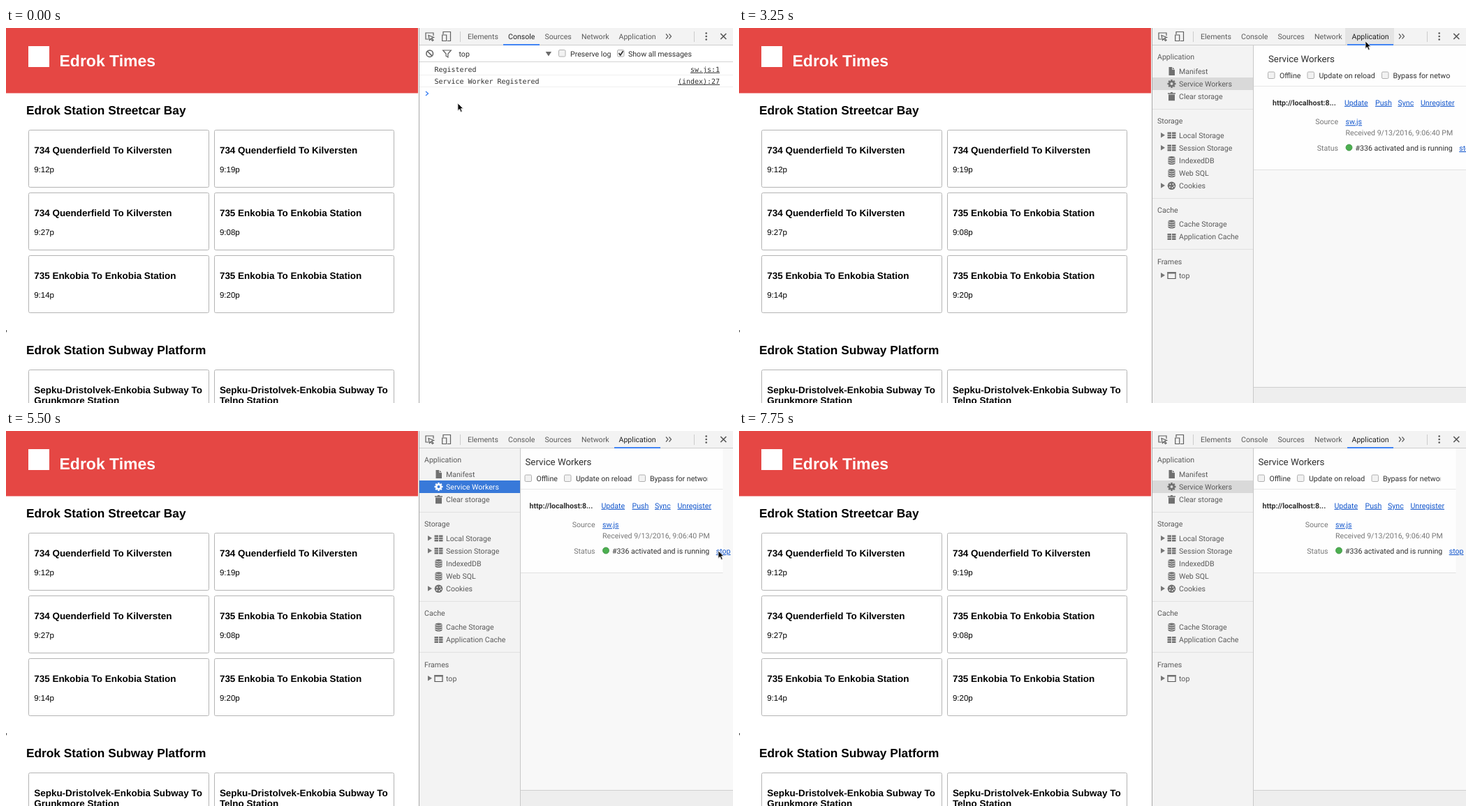
These frames come from a looping animation (1041x538 px, 8000 ms). An HTML page:

```html
<!DOCTYPE html>
<html lang="en">
<head>
<meta charset="utf-8">
<title>Departures with developer tools</title>
<style>
html, body { margin: 0; width: 100%; height: 100%; overflow: hidden; background: #fff; }
svg { display: block; width: 1041px; height: 538px; text-rendering: geometricPrecision; }
text { white-space: pre; }
.page { font-family: "Liberation Sans", Arial, sans-serif; font-size: 11.52px; fill: #000; }
.page .title { font-size: 23px; font-weight: 700; fill: #fff; }
.page .h2 { font-size: 17.3px; font-weight: 700; }
.page .h3 { font-size: 13.48px; font-weight: 700; }
.tools { font-family: Roboto, Inter, sans-serif; font-size: 10.6px; fill: #303030; }
.tools .tab, .tools .item { fill: #5a5a5a; }
.tools .tab.on { fill: #222; }
.tools .big { font-size: 13.25px; }
.tools .bold { font-weight: 700; }
.tools .dim { fill: #777; }
.tools .link { fill: #1155cc; text-decoration: underline; }
.tools .mono { font-family: "DejaVu Sans Mono", monospace; font-size: 9.97px; }
.tools .under { text-decoration: underline; }
.line { fill: none; stroke: #5f5f5f; stroke-width: 1.2; }
.ico { fill: #707070; color: #f3f3f3; }
.ring { fill: none; stroke: #707070; stroke-width: 2.6; }
.focused .ico { fill: #fff; color: #3879d9; }
.focused .ring { stroke: #fff; }
.focused .item { fill: #fff; }
</style>
</head>
<body>
<svg id="stage" viewBox="0 0 1041 538"></svg>
<script>
const text = (x, y, str, cls = "", extra = "") =>
  `<text x="${x}" y="${y}" class="${cls}" ${extra}>${str}</text>`;
const rect = (x, y, w, h, fill, extra = "") =>
  `<rect x="${x}" y="${y}" width="${w}" height="${h}" fill="${fill}" ${extra}/>`;
const path = (d, extra = 'class="line"') => `<path d="${d}" ${extra}/>`;
const end = 'text-anchor="end"';

// Timetable page; card borders snap to whole pixels
const snap = v => Math.floor(v) + .5;
const card = (x, y, lines, time) =>
  rect(snap(x), snap(y), snap(x + 257.6) - snap(x), snap(y + 82.1) - snap(y), "#fff", 'rx="2" stroke="#b4b4b4"') +
  lines.map((s, i) => text(x + 7.7, y + 33.6 + i * 15, s, "h3")).join("") +
  (time ? text(x + 7.7, y + 60.3, time) : "");

const lakeLine = "734 Quenderfield To Kilversten";
const hillLine = "735 Enkobia To Enkobia Station";
const departures = [
  [lakeLine, "9:12p"], [lakeLine, "9:19p"], [lakeLine, "9:27p"],
  [hillLine, "9:08p"], [hillLine, "9:14p"], [hillLine, "9:20p"]
];
const column = i => 32.5 + (i % 2) * 265.7;

const page = `<g class="page">
  ${rect(0, 0, 591, 538, "#fff")}
  ${rect(0, 0, 590, 93.5, "#e54744")}
  ${rect(32, 26, 30, 30, "#fff")}
  ${text(76.5, 55, "Edrok Times", "title")}
  ${text(29, 123.7, "Edrok Station Streetcar Bay", "h2")}
  ${departures.map(([name, time], i) =>
    card(column(i), 146.4 + Math.floor(i / 2) * 89.9, [name], time)).join("")}
  ${text(-1, 434.5, ",")}
  ${text(29, 468, "Edrok Station Subway Platform", "h2")}
  ${["Grunkmore Station", "Telno Station"].map((stop, i) =>
    card(column(i), 490.4, ["Sepku-Dristolvek-Enkobia Subway To", stop])).join("")}
</g>`;

// Developer tools
const tabs = [["Elements", 661], ["Console", 719], ["Sources", 771.5], ["Network", 824], ["Application", 877.5]];
const toolbar =
  rect(592, 0, 449, 24, "#f3f3f3") +
  rect(868, 0, 70, 24, "#e4e4e4", 'id="hover"') +
  rect(592, 24, 449, 1, "#cdcdcd") +
  path("M605 16h-4v-9h11v4M605 10.5l7.5 3-3 1 2.5 3-1.5 1-2.3-3-1.8 2z") +
  path("M626 9V5.5h10.5v13H632M624.7 10h6v8.5h-6z") +
  path("M650.5 5v15M985.5 5v15", 'stroke="#ccc"') +
  tabs.map(([name, x]) => text(x, 15.8, name, "tab", `id="tab${name}"`)).join("") +
  path("M945 8.5l3 3.5-3 3.5M949.5 8.5l3 3.5-3 3.5") +
  [7.5, 12, 16.5].map(y => `<circle cx="1002.7" cy="${y}" r="1.3" fill="#555"/>`).join("") +
  path("M1023.3 8l8 8m0-8l-8 8", 'stroke="#555" stroke-width="1.6"') +
  rect(0, 23, 1, 2, "#4285f4", 'id="underline"');

const checkbox = (x, y, on) =>
  rect(x + .5, y + .5, 9.5, 9.5, "#f2f2f2", 'rx="1.5" stroke="#b0b0b0"') +
  (on ? path(`M${x + 2.5} ${y + 5}l2.2 3 4-6`, 'fill="none" stroke="#333" stroke-width="1.7"') : "");

const logRow = (y, message, place) =>
  text(613.5, y, message, "mono") + text(1022, y, place, "mono under", end) +
  rect(592, y + 4.2, 449, 1, "#f0f0f0");

const consoleView = `<g id="console">
  ${rect(592, 25, 449, 513, "#fff")}
  ${rect(592, 48, 449, 1, "#d4d4d4")}
  <circle cx="606.7" cy="36.7" r="4.8" class="line" style="stroke-width:1.5"/>
  ${path("M603.3 33.3l6.8 6.8", 'class="line" style="stroke-width:1.5"')}
  ${path("M625.7 32h11.6l-4.4 5v5l-2.8-1.8V37z")}
  ${text(648.5, 40.5, "top")}
  ${path("M772.7 34h8.4l-4.2 6.5z", 'fill="#6b6b6b"')}
  ${checkbox(791, 31)}${text(808, 40.5, "Preserve log")}
  ${checkbox(875, 31, true)}${text(891, 40.5, "Show all messages")}
  ${logRow(62.8, "Registered", "sw.js:1")}
  ${logRow(79.8, "Service Worker Registered", "(index):27")}
  ${path("M601 91l3.4 3-3.4 3", 'fill="none" stroke="#4285f4" stroke-width="1.5"')}
  ${rect(614, 88, 1, 11, "#222", 'id="caret"')}
</g>`;

// Sidebar icons, centred on their own origin
const icons = {
  doc: '<path d="M-4-6H1L4.5-2.5V6H-4z"/><path d="M1-6v3.5h3.5" fill="none" stroke="currentColor" stroke-width=".8"/>',
  gear: '<circle r="3.3" class="ring"/>' +
    [0, 45, 90, 135].map(a => `<path d="M-1.2-6h2.4v3h-2.4zM-1.2 3h2.4v3h-2.4z" transform="rotate(${a})"/>`).join(""),
  trash: '<path d="M-5.5-5H-2l1-1.2h2l1 1.2h3.5v1.5h-11zM-4.5-2.7h9V6h-9z"/>',
  table: [-4.5, -1.3, 1.9].map(y => `<path d="M-6 ${y}h5.5v2.5H-6zM.5 ${y}H6v2.5H.5z"/>`).join(""),
  db: '<path d="M-5-4C-5-6.7 5-6.7 5-4V4C5 6.7-5 6.7-5 4z"/>' +
    [-3.6, -.5, 2.6].map(y => `<path d="M-5 ${y}q5 3 10 0" fill="none" stroke="currentColor" stroke-width=".9"/>`).join(""),
  cookie: '<circle r="5.8"/>' + [[-2, -2], [2, -2.4], [-2.6, 2], [1, 2.6], [3.4, .8]].map(
    ([x, y]) => `<circle cx="${x}" cy="${y}" r="1" fill="currentColor"/>`).join(""),
  frame: '<path d="M-5.5-4.5h11v9h-11z" fill="none" stroke="#555" stroke-width="1.2"/><path d="M-6-5H6v2.5H-6z"/>'
};
const item = (y, icon, name, opens) =>
  (opens ? path(`M604 ${y - 4}l6 3.7-6 3.7z`, 'fill="#777"') : "") +
  `<g class="ico" transform="translate(619.5 ${y})">${icons[icon]}</g>` +
  text(630, y + 3.9, name, "item");
const heading = (y, name) => text(599, y + 4, name, "item");

const sidebar =
  rect(592, 25, 144, 513, "#f3f3f3") + rect(736, 25, 1, 513, "#c8c8c8") +
  [116, 244, 317].map(y => rect(592, y, 144, 1, "#e1e1e1")).join("") +
  heading(41, "Application") + item(62, "doc", "Manifest") +
  `<g id="selected">${rect(592, 71, 144, 18, "#d9d9d9", 'id="selection"')}${item(80, "gear", "Service Workers")}</g>` +
  item(98.3, "trash", "Clear storage") +
  heading(133, "Storage") +
  item(154, "table", "Local Storage", true) + item(172, "table", "Session Storage", true) +
  item(190, "db", "IndexedDB") + item(208.3, "db", "Web SQL") + item(226.3, "cookie", "Cookies", true) +
  heading(260.5, "Cache") + item(281.5, "db", "Cache Storage") + item(299.5, "table", "Application Cache") +
  heading(334.5, "Frames") + item(355, "frame", "top", true);

const links = [["Update", 867], ["Push", 911], ["Sync", 943.5], ["Unregister", 976]];
const workers = `<g id="workers">
  ${rect(737, 25, 304, 178, "#fefefe")}
  ${rect(737, 83, 304, 1, "#e6e6e6")}${rect(737, 203, 304, 1, "#e0e0e0")}
  ${text(758, 48.6, "Service Workers", "big")}
  ${checkbox(757, 62.5)}${text(774, 71.8, "Offline")}
  ${checkbox(813.5, 62.5)}${text(830.5, 71.8, "Update on reload")}
  ${checkbox(920, 62.5)}${text(936.5, 71.8, "Bypass for network", "", 'clip-path="url(#cut)"')}
  ${text(764, 110.8, "http://localhost:8...", "bold")}
  ${links.map(([name, x]) => text(x, 110.8, name, "link")).join("")}
  ${text(858, 138.3, "Source", "dim", end)}${text(868.5, 138.3, "sw.js", "link")}
  ${text(868.5, 153.6, "Received 9/13/2016, 9:06:40 PM", "dim")}
  ${text(858, 176, "Status", "dim", end)}
  <circle cx="873.5" cy="171.5" r="4.5" fill="#4caf50" stroke="#3c8f42" stroke-width=".8"/>
  ${text(882.5, 176, "#336 activated and is running")}${text(1031.2, 176, "stop", "link")}
</g>`;

const application = `<g id="application">
  ${rect(737, 25, 304, 513, "#f8f8f8")}
  ${workers}
  ${rect(737, 516, 304, 22, "#eee")}${rect(737, 515, 304, 1, "#d0d0d0")}
  ${sidebar}
</g>`;

const cursor = path("M0 0V11L2.6 8.7 4.5 13.1 6.4 12.3 4.6 8H8z",
  'id="cursor" fill="#000" stroke="#fff" stroke-width=".8" style="filter:drop-shadow(0 .4px .5px #0006)"');

const stage = document.getElementById("stage");
stage.innerHTML = `<defs><clipPath id="cut">${rect(930, 58, 89, 20, "#000")}</clipPath></defs>
  ${page}
  <g class="tools">${consoleView}${application}${toolbar}${rect(591, 0, 1, 538, "#a8a8a8")}</g>
  ${cursor}`;

// Pointer at each tick: x, y, optional size
const TICK = 250, LOOP = 8000;
const pointer = [
  [647, 108], [640, 106], [608, 98], [570, 90], [538, 85], [519, 82], [420, 76], [366, 72],
  [618, 96], [925, 147], [968, 40], [904, 22], [897, 19], [897, 19], [880, 85], [824, 186],
  [720, 100], [662, 82], [655, 86], [642, 123], [750, 150], [815, 165], [1020, 172], [880, 178],
  [985, 165], [850, 170], [844.5, 154, 4.3], [862, 162, 2.4], [890, 164], [910, 162], [917, 160], null
];

const part = id => document.getElementById(id);
const show = (id, on) => part(id).style.visibility = on ? "visible" : "hidden";
let shown = -1;

function draw(now) {
  const time = now % LOOP;
  const tick = Math.floor(time / TICK);
  if (tick === shown) return;
  shown = tick;
  const at = ms => time >= ms;
  const inApp = at(3250), focused = at(4250) && !at(7750);
  part("console").style.display = inApp ? "none" : "";
  part("application").style.display = inApp ? "" : "none";
  show("caret", at(2000) && !inApp);
  show("hover", at(2750) && !at(3500));
  part("tabConsole").classList.toggle("on", !inApp);
  part("tabApplication").classList.toggle("on", at(2750));
  part("underline").setAttribute("x", inApp ? 871 : 712);
  part("underline").setAttribute("width", inApp ? 66 : 52);
  part("selected").classList.toggle("focused", focused);
  part("selection").setAttribute("fill", focused ? "#3879d9" : "#d9d9d9");
  part("workers").setAttribute("transform", `translate(${at(5500) ? -14.5 : 0} 0)`);
  const spot = pointer[tick];
  show("cursor", spot);
  if (spot) {
    const [x, y, size = .95] = spot;
    part("cursor").setAttribute("transform", `translate(${x} ${y}) scale(${size})`);
  }
}

const start = performance.now();
function loop() {
  draw(performance.now() - start);
  requestAnimationFrame(loop);
}
loop();
</script>
</body>
</html>
```
